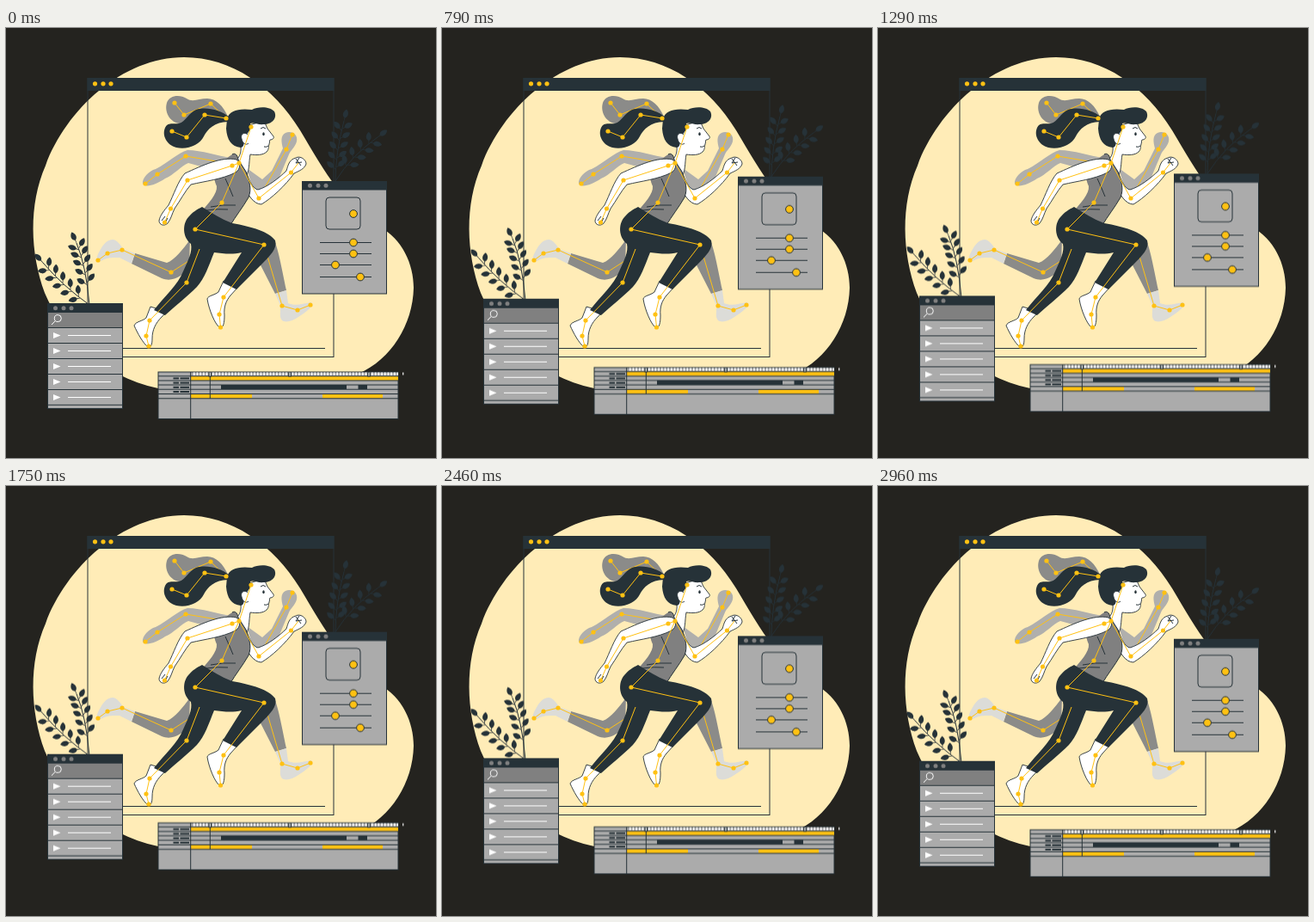
An HTML page that plays this animation: 500 px wide and 500 px high, repeating every 3000 ms.

```html
<!DOCTYPE html>
<html lang="en">
<head>
<meta charset="utf-8">
<title>Motion design</title>
<style>
html, body { margin: 0; width: 100%; height: 100%; overflow: hidden; background: #24231f; }
svg { display: block; width: 100vw; height: 100vh; }
.navy { fill: #263238; }
.line { fill: none; stroke: #263238; stroke-width: 1; }
.skin { fill: #fff; stroke: #263238; stroke-width: .9; stroke-linejoin: round; }
.gold { fill: #ffc113; }
.bone { fill: none; stroke: #ffc113; stroke-width: 1; }
.panel { fill: #ababab; stroke: #263238; stroke-width: 1; }
.mid { fill: #808080; }
.ghost { fill: #b0afac; }
.shade { fill: #8b8b89; }
.pale { fill: #dcdcd8; }
.white { fill: none; stroke: #fff; stroke-width: 1; }
</style>
</head>
<body>
<svg id="stage" viewBox="0 0 500 500" xmlns="http://www.w3.org/2000/svg"></svg>
<script>
const path = (cls, d) => `<path class="${cls}" d="${d}"/>`;
const rect = (cls, x, y, w, h, rx = 0) =>
  `<rect class="${cls}" x="${x}" y="${y}" width="${w}" height="${h}" rx="${rx}"/>`;
const dot = (cls, x, y, r = 2.6) => `<circle class="${cls}" cx="${x}" cy="${y}" r="${r}"/>`;
const dots = (cls, xs, y, r) => xs.map(x => dot(cls, x, y, r)).join('');
const hline = (cls, x1, x2, y) => path(cls, `M${x1} ${y}H${x2}`);

// A chain of joints; the first `skip` points get no marker.
function bones(points, skip = 0) {
  return path('bone', 'M' + points.join('L')) +
    points.slice(skip).map(([x, y]) => dot('gold', x, y)).join('');
}

// Curved stem with paired leaves and one leaf at the tip.
function branch(a, b, c, pairs, from, size) {
  const leaf = (x, y, angle) =>
    `<path class="navy" transform="translate(${x} ${y}) rotate(${angle}) scale(${size})"
      d="M0 -.3L4 -.5C6 -4.5 11 -4.6 15 -.5C12 4 6 4 4 .5L0 .3Z"/>`;
  const at = t => {
    const u = 1 - t;
    const pos = i => u * u * a[i] + 2 * u * t * b[i] + t * t * c[i];
    const vel = i => u * (b[i] - a[i]) + t * (c[i] - b[i]);
    return [pos(0), pos(1), Math.atan2(vel(1), vel(0)) * 180 / Math.PI];
  };
  let out = path('line', `M${a}Q${b} ${c}`);
  for (let i = 0; i < pairs; i++) {
    const t = from + (1 - from) * i / pairs;
    for (const side of [-1, 1]) {
      const [x, y, dir] = at(t + (side > 0 ? .03 : 0));
      out += leaf(x, y, dir + side * 50);
    }
  }
  const [x, y, dir] = at(1);
  return out + leaf(x, y, dir);
}

function backdrop() {
  return `<path fill="#ffecb7" d="M207 34C262 34 311 68 342 119C371 168 395 210 434 231
    C461 245 474 275 474 302C473 345 448 385 410 402C350 425 240 430 177 419
    C110 405 66 358 45 308C28 262 26 205 46 160C70 95 135 34 207 34Z"/>` +
    rect('line', 95, 58.5, 286, 324) + rect('navy', 94.5, 58, 287, 15) +
    dots('gold', [103.5, 113, 122], 64.8, 2.6) + hline('line', 100, 371, 372.5);
}

function ghost() {
  return path('shade', `M258 103C253 91 244 82 234 82C224 82 217 87 210 82C202 77 190 78 187 87
      C184 97 190 109 201 111C213 113 221 104 230 98C240 94 248 98 258 105Z`) +
    path('ghost', `M262 151C246 149 228 142 211 142C200 145 188 157 174 164C166 166 158 175 159 181
      C162 186 173 183 185 175C195 171 204 160 212 157C225 160 240 166 252 165Z`) +
    path('ghost', `M280 163L298 176L309 166L322 140C320 132 319 125 325 122C331 119 340 123 338 132
      C336 139 331 142 329 147L318 173L302 192L287 188Z`) +
    path('shade', `M214 246C206 257 196 270 187 273L150 262L146 274L181 291C193 296 205 289 213 278Z`) +
    path('pale', `M150 262L136 257C132 250 128 246 124 246C116 246 111 255 107 263C104 270 106 273 110 271
      C118 266 126 267 132 267L146 274Z`) +
    path('shade', `M312 247C317 258 321 282 326 305L313 309L290 264Z`) +
    path('pale', `M313 309L326 305L328 320C337 324 347 320 355 319C358 324 348 331 340 336
      C333 341 325 343 321 340C317 336 320 327 319 322Z`) +
    bones([[256, 105], [238, 88], [207, 101], [196, 87]], 1) +
    bones([[263, 158], [209, 149], [176, 170], [162, 181]], 1) +
    bones([[294, 198], [326, 141], [333, 124]], 1) +
    bones([[220, 266], [192, 284], [135, 258], [118, 262], [107, 270]], 1) +
    bones([[300, 252], [321, 323], [339, 328], [354, 322]], 1);
}

function head() {
  return path('navy', `M260 104C250 95 232 91 221 95C212 99 209 109 201 111C194 112 188 109 185 116
      C181 125 187 136 198 139C211 142 225 136 230 126C234 118 243 109 258 109Z`) +
    path('skin', `M273 138C274 147 270 152 266 155L277 176C284 167 282 157 284 147
      C291 148 299 148 303 144C306 141 305 138 306 135C307 132 306 131 307 130
      C310 130 312 128 311 126L304 117L300 108L272 116Z`) +
    path('navy', `M257 106C259 96 271 93 286 95C293 91 307 91 312 97C316 105 309 112 300 112
      C293 113 287 109 284 111C286 118 281 122 279 125C276 132 278 138 273 139C262 138 257 130 256 117Z`) +
    path('skin', `M281 124C277 120 272 124 274 129C275 134 279 137 282 134`) +
    path('line', 'M296 117Q299 114 302 117M300 138Q303 139 305 137') +
    `<ellipse class="navy" cx="299.5" cy="123.3" rx="1.2" ry="2"/>`;
}

function body() {
  return path('skin', `M278 166C283 178 287 187 293 188C304 185 318 174 326 166C328 160 329 153 337 151
      C342 148 349 153 349 158C347 164 341 166 335 169C325 183 309 198 297 205C288 205 281 194 277 183Z`) +
    path('line', 'M337 152L343 160M341 151L337 157L344 156') +
    path('mid', `M263 147C266 145 269 147 270 153L279 167C283 178 286 187 282 197C275 209 267 219 261 229
      L227 214C235 204 246 193 245 184C242 177 240 172 247 161C253 155 258 150 263 147Z`) +
    path('line', `M263 147C266 145 269 147 270 153L279 167C283 178 286 187 282 197C275 209 267 219 261 229
      M238 208Q252 205 267 206M233 212Q247 210 258 211M255 175Q260 186 264 196`) +
    path('skin', `M168 324L163 337C159 341 151 341 149 346C153 355 159 366 165 371
      C169 372 170 367 170 361C170 351 174 343 181 336L187 330Z`) +
    path('skin', `M253 294L247 307C242 311 235 311 234 315C236 328 243 344 248 348
      C253 350 254 342 254 334C253 324 256 317 261 311L270 301Z`) +
    path('navy', `M228 208C239 215 250 222 263 227C286 231 306 237 313 247C316 256 307 265 297 275
      L268 304L252 296L274 261C262 264 252 262 242 261C236 276 231 291 222 301
      C210 313 196 324 185 334L172 328C184 312 200 299 206 283C212 270 217 260 215 251
      C205 243 205 228 212 220C217 214 222 211 228 208Z`) +
    path('skin', `M268 153C251 149 228 160 208 169C200 178 195 194 189 206C184 212 179 218 178 224
      C178 229 184 231 188 227C192 222 193 216 196 210C203 200 208 190 215 182
      C232 178 251 176 267 168C273 164 273 156 268 153Z`) +
    path('line', 'M181 224L185 219M184 228L188 221') +
    bones([[256, 105], [231, 101], [210, 127], [193, 120]]) +
    bones([[285, 115], [271, 157], [251, 203], [220, 234], [300, 252], [253, 313], [248, 333], [249.5, 348]]) +
    bones([[271, 157], [263, 160], [211, 177], [191.5, 210], [184.5, 226]], 1) +
    bones([[271, 157], [294, 198], [331.5, 168], [340, 157]], 1).replace(dot('gold', 340, 157), '') +
    bones([[225, 257], [210, 296], [167, 340], [163, 358], [166, 370]], 1);
}

function listPanel() {
  let out = branch([97, 322], [93, 276], [82, 250], 5, .27, .92) +
    branch([97, 322], [66, 300], [43, 273], 5, .18, .92) +
    rect('panel', 48.5, 320.5, 87, 122) + rect('mid', 49, 331, 86, 17.5) +
    rect('navy', 48, 320, 88, 11) + dots('mid', [57.5, 67, 76], 325.7, 2.5) +
    dot('white', 60.3, 337.6, 4) + path('white', 'M57.3 340.5L53 345');
  for (let i = 0; i < 5; i++) {
    const y = 348.5 + 18 * i;
    out += hline('line', 48, 136, y) + hline('white', 72, 122, y + 9) +
      `<path fill="#fff" d="M55 ${y + 5.5}L63.5 ${y + 9}L55 ${y + 12.5}Z"/>`;
  }
  return out + hline('line', 48, 136, 438.3);
}

function sliderPanel() {
  const knob = (x, y) => `<g stroke="#263238">${dot('gold', x, y, 4.4)}</g>`;
  const sliders = [[404, 249.5], [404, 262.5], [383, 275.5], [412, 289.5]];
  return branch([383, 180], [383, 145], [393, 108], 5, .22, .92) +
    branch([383, 178], [402, 148], [432, 127], 4, .3, .92) +
    rect('panel', 344.5, 178.5, 98, 130.5) + rect('navy', 344, 178, 99, 10.5) +
    dots('mid', [353.5, 363, 372], 183.2, 2.5) +
    rect('line', 372, 197, 40, 37, 4) + knob(404, 216) +
    sliders.map(([x, y]) => hline('line', 365, 425, y) + knob(x, y)).join('');
}

function timeline() {
  let out = rect('panel', 177, 400, 279, 54.5) +
    rect('gold', 215, 405, 241, 4.8) + rect('gold', 215, 426, 71, 4.7) + rect('gold', 368, 426, 70, 4.7) +
    rect('navy', 250, 415, 146, 5) + rect('navy', 409.5, 415, 10.5, 5);
  for (const y of [404.8, 410, 415, 420.2, 425.5, 430.8]) out += hline('line', 177, 456, y);
  for (const y of [406.4, 411.6, 416.8, 422])
    out += rect('navy', 194.5, y, 6.5, 2) + rect('navy', 202.5, y, 10.5, 2);
  out += `<path d="M218 402.2H456" stroke="#fff" stroke-width="3.4" stroke-dasharray="1.5 2.2"/>` +
    `<path d="M461.7 400.5V403.5" stroke="#ddd" stroke-width="1.4"/>`;
  for (const x of [237.3, 330, 422])
    out += rect('navy', x - 1.8, 400.5, 3.6, 5) +
      `<path d="M${x} 401V404.5" stroke="#fff" stroke-width="1.2"/>`;
  return out + path('line', 'M214.7 400V454.5M237.3 405V431');
}

const stage = document.getElementById('stage');
stage.innerHTML = backdrop() + ghost() + head() + body() +
  `<g id="float">${sliderPanel()}${listPanel()}${timeline()}</g>`;

document.getElementById('float').animate(
  [0, -10, 0].map(y => ({ transform: `translateY(${y}px)` })),
  { duration: 3000, iterations: Infinity, easing: 'linear' }
);
</script>
</body>
</html>
```
